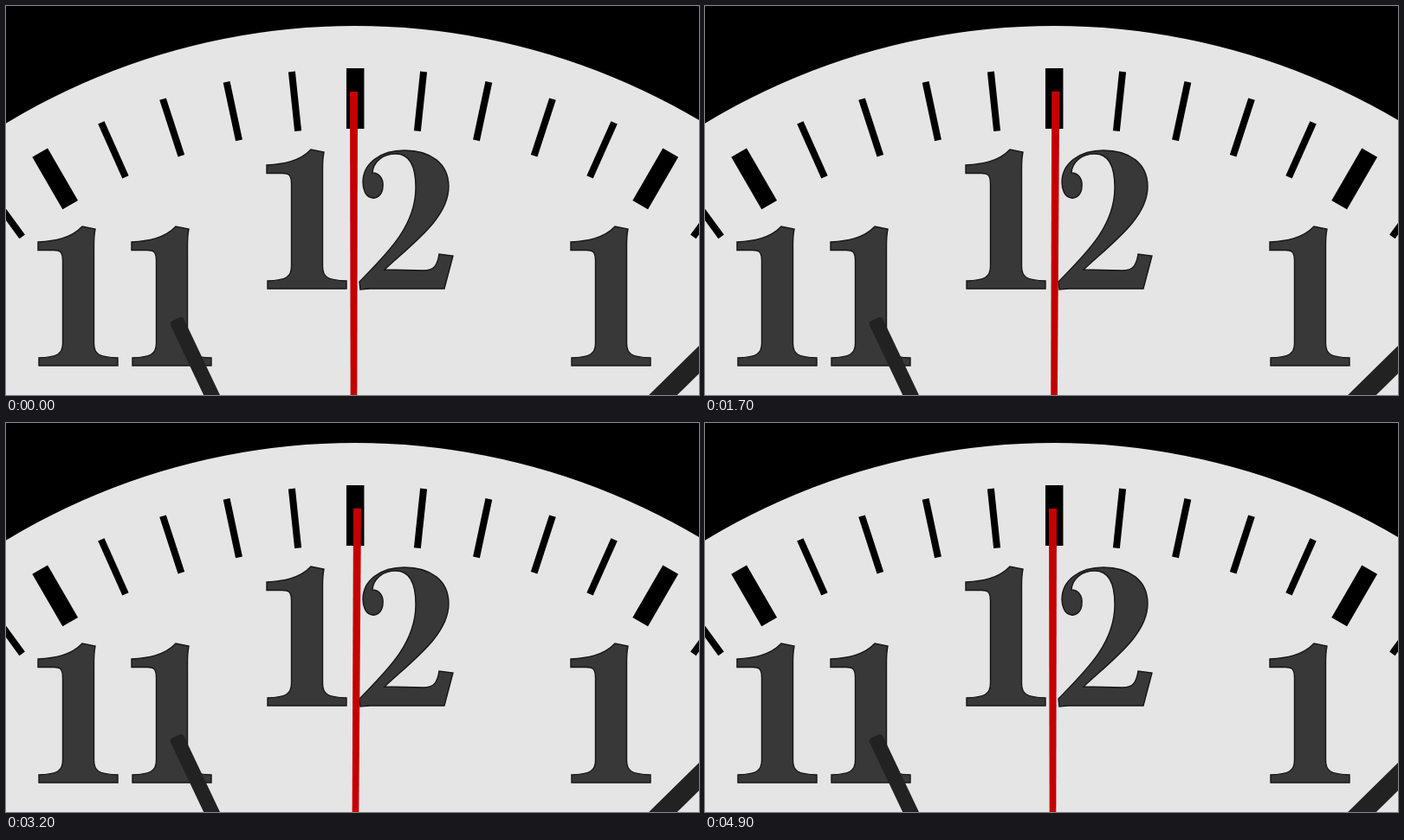
An HTML page with a canvas that plays this animation: 800x450 px, repeating every 5000 ms.

```html
<!DOCTYPE html>
<html lang="en">
<head>
<meta charset="utf-8">
<title>Clock</title>
<style>
  html, body { margin: 0; width: 100%; height: 100%; overflow: hidden; background: #000; }
  canvas { display: block; width: 800px; height: 450px; }
</style>
</head>
<body>
<canvas id="stage" width="800" height="450" role="img" aria-label="Clock face: 11, 12, 1"></canvas>
<script>
const ctx = document.getElementById('stage').getContext('2d');
const LOOP = 5000, STEP = 100, CY = 800;
const rad = deg => deg * Math.PI / 180;

const ONE = new Path2D('M0 18C18 17 38 14 51 0L66 3C65 8 64.5 14 64.5 22V135C64.5 148 70 151 92 152V161H1V152C22 151 28.5 148 28.5 135V40C28.5 29 25 27.5 18 27.5H0Z');
const TWO = new Path2D('M409 328L408 319C440 286 473 255 473 210C473 185 466 171 450 171C435 171 424 180 423 193C431 193 436 200 435 209C435 219 427 223 423 222C415 221 412 212 412 204C412 182 432 167 460 167C490 167 511 182 511 209C511 245 470 274 437 305L482 306C494 306 498 300 500 287L516 289L506 327H420C415 327 412 328 409 328Z');

// Second hand: [step, sideways shift of the tip in pixels]
const SWING = [
  [0, 0], [2.5, -2], [5, 4], [9, 6], [13, 4.5], [17, 3.2], [18, -3],
  [20, -20], [22, -41], [24, -62], [26, -41], [30, 0], [32, 4], [36, 4],
  [40, 6], [44, 4], [46.5, -2], [49, 0], [50, 0]
];

function tipShift(step) {
  const i = SWING.findIndex(([s]) => s > step);
  const [s0, v0] = SWING[i - 1], [s1, v1] = SWING[i];
  return v0 + (v1 - v0) * (step - s0) / (s1 - s0);
}

// Runs draw in a frame rotated about (x, y)
function turned(x, y, angle, draw) {
  ctx.save();
  ctx.translate(x, y);
  ctx.rotate(angle);
  draw();
  ctx.restore();
}

function drawTicks() {
  ctx.fillStyle = '#000';
  for (let i = -6; i <= 6; i++) {
    const thick = i % 5 === 0;
    const w = thick ? 20.5 : 8;
    turned(thick ? 403.2 : 406, CY, rad(i * 6), () =>
      ctx.fillRect(-w / 2, -728, w, thick ? 70 : 69));
  }
}

function drawNumeral(path, x = 0, y = 0) {
  ctx.save();
  ctx.translate(x, y);
  ctx.fillStyle = '#383838';
  ctx.strokeStyle = '#161616';
  ctx.lineWidth = 1.4;
  ctx.fill(path);
  ctx.stroke(path);
  ctx.restore();
}

function drawHand(deg, width, length) {
  ctx.fillStyle = '#222';
  turned(403, CY, rad(deg), () => {
    ctx.beginPath();
    ctx.roundRect(-width / 2, -length, width, length, 4);
    ctx.fill();
  });
}

function drawSecondHand(step) {
  const px = 450, py = 790, x = 401.5 - px;
  turned(px, py, Math.asin(tipShift(step) / (py - 99)), () => {
    ctx.fillStyle = '#c40000';
    ctx.beginPath();
    ctx.moveTo(x - 4.5, 99 - py);
    ctx.lineTo(x + 4.5, 99 - py);
    ctx.lineTo(x + 3.2, 0);
    ctx.lineTo(x - 3.2, 0);
    ctx.fill();
  });
}

function draw(step) {
  ctx.fillStyle = '#000';
  ctx.fillRect(0, 0, 800, 450);
  ctx.fillStyle = '#e5e5e5';
  ctx.beginPath();
  ctx.arc(403, CY, 777, 0, Math.PI * 2);
  ctx.fill();

  drawTicks();
  drawNumeral(ONE, 301, 166);
  drawNumeral(TWO);
  for (const x of [37, 145, 652]) drawNumeral(ONE, x, 255);

  drawHand(-25.3, 17, 484);
  drawHand(45.45, 23, 640);
  drawSecondHand(step);
}

const start = performance.now();
function tick() {
  const t = (performance.now() - start) % LOOP;
  draw(Math.floor(t / STEP));
  requestAnimationFrame(tick);
}
tick();
</script>
</body>
</html>
```
